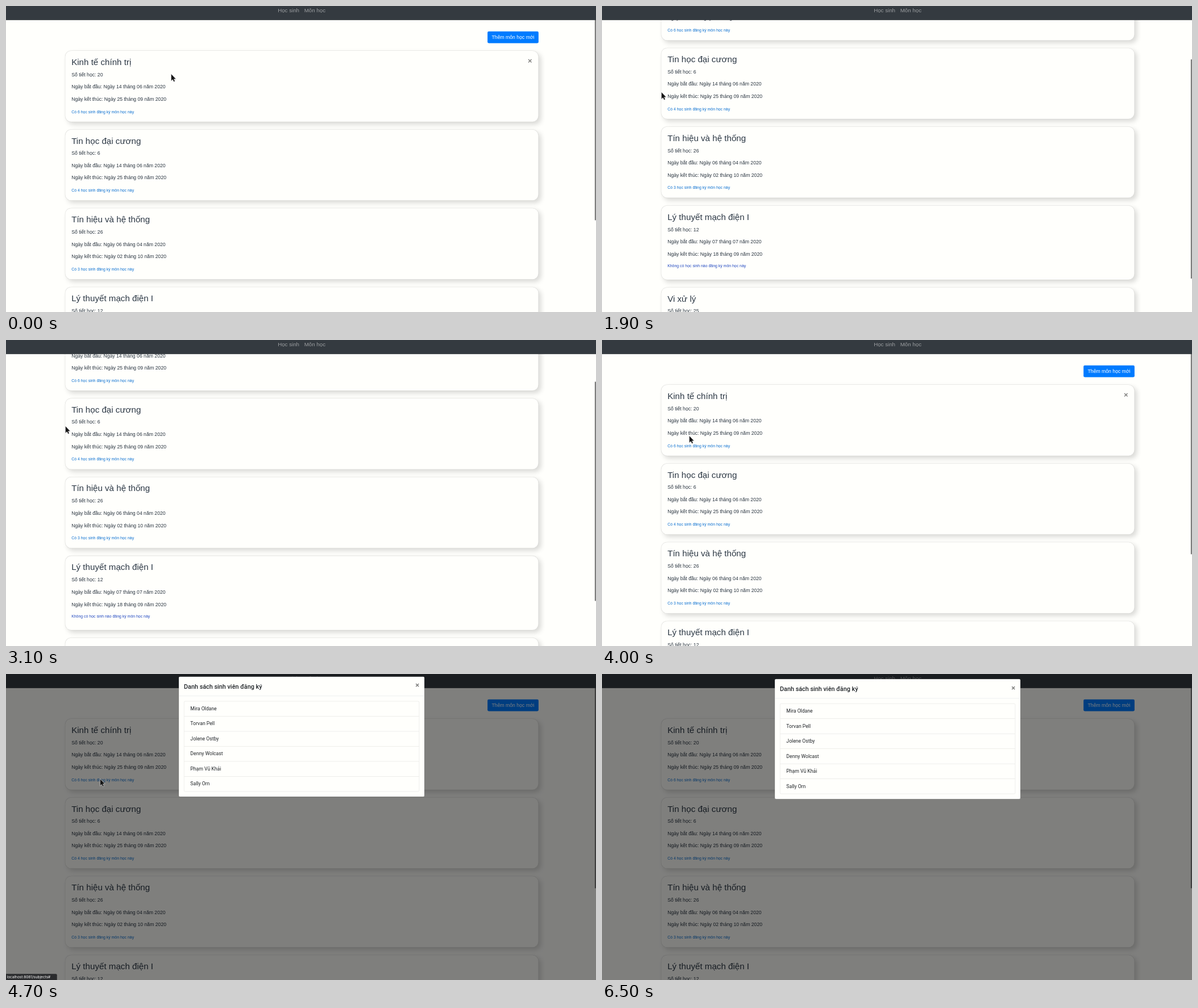
These frames come from a looping animation (1038 by 539 pixels, 7300 ms). An HTML page:

```html
<!DOCTYPE html>
<html lang="vi">
<meta charset="utf-8">
<title>Môn học</title>
<style>
  html, body { margin: 0; width: 100%; height: 100%; overflow: hidden; background: #fffffc; }
  * { box-sizing: border-box; }
  #stage { position: absolute; width: 1920px; height: 997px; overflow: hidden; transform: scale(.540625);
    transform-origin: 0 0; background: #fffffc; color: #2a3541; font: 16px/24px "Liberation Sans", Arial, sans-serif; }
  #stage > * { position: absolute; }
  #page { left: 192px; top: 83.3px; width: 1541px; }
  .add { width: 166px; height: 38px; margin: 0 0 24px auto; border-radius: 4px; background: #007bff;
    color: #fff; line-height: 38px; text-align: center; }
  .card { position: relative; margin-bottom: 24px; padding: 20px; border: 1px solid rgba(0,0,0,.125);
    border-radius: 20px; background: #fffffc; box-shadow: 8px 8px 16px rgba(0,0,0,.15); }
  h3 { margin: 0 0 12px; font: 28px/33.6px "Liberation Sans", Arial, sans-serif; color: #2c3845; }
  p { margin: 0 0 16px; }
  small { font-size: 12.8px; color: #0a6fd0; }
  p.none { font-size: 12.8px; line-height: 19.2px; color: #2148c0; }
  .close { position: absolute; right: 20px; top: 20px; font-size: 24px; font-weight: 700; line-height: 24px; opacity: .5; color: #000; }
  #thumb { left: 1916px; width: 4px; height: 714px; background: #7c7c7c; }
  nav { width: 1924px; height: 46px; background: #343a40; color: #9a9d9f; font-size: 18px; line-height: 31px; text-align: center; }
  nav span { margin: 0 8px; }
  #shade { inset: 0; background: #000; }
  #modal { left: 562px; top: 16px; width: 800px; border: 1px solid rgba(0,0,0,.2); border-radius: 5px;
    background: #fffffc; color: #212529; font-family: Roboto, sans-serif; }
  #modal header { padding: 16px; border-bottom: 1px solid #dee2e6; font-size: 20px; font-weight: 500; line-height: 30px; }
  #modal .close { right: 16px; top: 16px; }
  ul { margin: 16px; padding: 0; list-style: none; border: 1px solid #dfdfdd; border-radius: 4px; }
  li { height: 49px; padding: 0 20px; line-height: 48px; border-bottom: 1px solid #dfdfdd; }
  li:last-child { border: 0; height: 48px; }
  #status { left: 0; bottom: 0; width: 166px; height: 20px; padding-left: 3px; border-top-right-radius: 4px;
    background: #2a2b2d; color: #fff; font: 12px/20px Inter, sans-serif; white-space: nowrap; }
  #cursor { left: 0; top: 0; width: 20px; height: 28px; overflow: visible; }
</style>
<div id="stage">
  <div id="page"><div class="add">Thêm môn học mới</div></div>
  <div id="thumb"></div>
  <nav><span>Học sinh</span><span>Môn học</span></nav>
  <div id="shade"></div>
  <div id="modal">
    <header>Danh sách sinh viên đăng ký<span class="close">×</span></header>
    <ul></ul>
  </div>
  <div id="status">localhost:8081/subjects#</div>
  <svg id="cursor" viewBox="0 0 10 14"><path d="M.4 .4V12.2L3 9.8L4.8 13.4L6.8 12.5L5.2 9H8.5Z" fill="#151515" stroke="#fff" stroke-width=".5"/></svg>
</div>
<script>
const $ = id => document.getElementById(id);
const SCALE = .540625, LOOP = 7300, NOTCH = 53.1;

const subjects = [
  ['Kinh tế chính trị', 20, '14 tháng 06', '25 tháng 09', 6],
  ['Tin học đại cương', 6, '14 tháng 06', '25 tháng 09', 4],
  ['Tín hiệu và hệ thống', 26, '06 tháng 04', '02 tháng 10', 3],
  ['Lý thuyết mạch điện I', 12, '07 tháng 07', '18 tháng 09', 0],
  ['Vi xử lý', 25, '07 tháng 07', '18 tháng 09', 2],
];
const students = ['Mira Oldane', 'Torvan Pell', 'Jolene Ostby', 'Denny Wolcast', 'Phạm Vũ Khải', 'Sally Orn'];

$('page').innerHTML += subjects.map(([name, lessons, from, to, count], i) => `<div class="card">
  <h3>${name}</h3>
  <p>Số tiết học: ${lessons}</p>
  <p>Ngày bắt đầu: Ngày ${from} năm 2020</p>
  <p>Ngày kết thúc: Ngày ${to} năm 2020</p>
  ${count ? `<div><small>Có ${count} học sinh đăng ký môn học này</small></div>`
          : '<p class="none">Không có học sinh nào đăng ký môn học này</p>'}
  ${i ? '' : '<span class="close" id="remove">×</span>'}</div>`).join('');
document.querySelector('ul').innerHTML = students.map(s => `<li>${s}</li>`).join('');

// [time, wheel notches]
const wheel = [[0, 0], [900, 1], [1400, 2], [1500, 4], [1900, 5], [2000, 6], [2400, 7],
  [2800, 6], [3000, 5], [3100, 4], [3400, 2], [3700, 0]];
// [time, x, y]
const path = [[0, 290, 119], [200, 268, 108], [400, 220, 113], [600, 155, 132], [800, 108, 148],
  [900, 104, 151], [3600, 104, 151], [4000, 153, 168], [4400, 164, 183], [4700, 165, 184],
  [5200, 636, 60], [6000, 224, 37.5], [6400, 32, 2], [LOOP, 32, 2]];

const progress = (t, start, length) => Math.min(1, Math.max(0, (t - start) / length));

function pointer(t) {
  const i = path.findIndex(p => p[0] > t);
  const [t0, x0, y0] = path[i - 1], [t1, x1, y1] = path[i];
  const k = (t - t0) / (t1 - t0);
  return [x0 + (x1 - x0) * k, y0 + (y1 - y0) * k];
}

function draw() {
  // The screen is sampled ten times a second
  const t = Math.floor(performance.now() % LOOP / 100) * 100;
  const scroll = wheel.filter(w => w[0] <= t).pop()[1] * NOTCH;
  $('page').style.transform = `translateY(${-scroll}px)`;
  $('thumb').style.top = -15.7 + scroll * .715 + 'px';
  $('remove').hidden = t >= 4500;
  $('shade').style.opacity = progress(t, 4400, 150) / 2;

  const slide = (1 - progress(t, 4500, 300)) ** 1.7;
  $('modal').style.opacity = progress(t, 4500, 150);
  $('modal').style.transform = `translateY(${-50 * slide}px)`;

  $('status').style.display = t >= 4400 && t < 5000 ? '' : 'none';
  const [x, y] = pointer(t);
  $('cursor').style.display = t < 6500 ? '' : 'none';
  $('cursor').style.transform = `translate(${x / SCALE}px, ${y / SCALE}px)`;
  requestAnimationFrame(draw);
}
draw();
</script>
</html>
```
